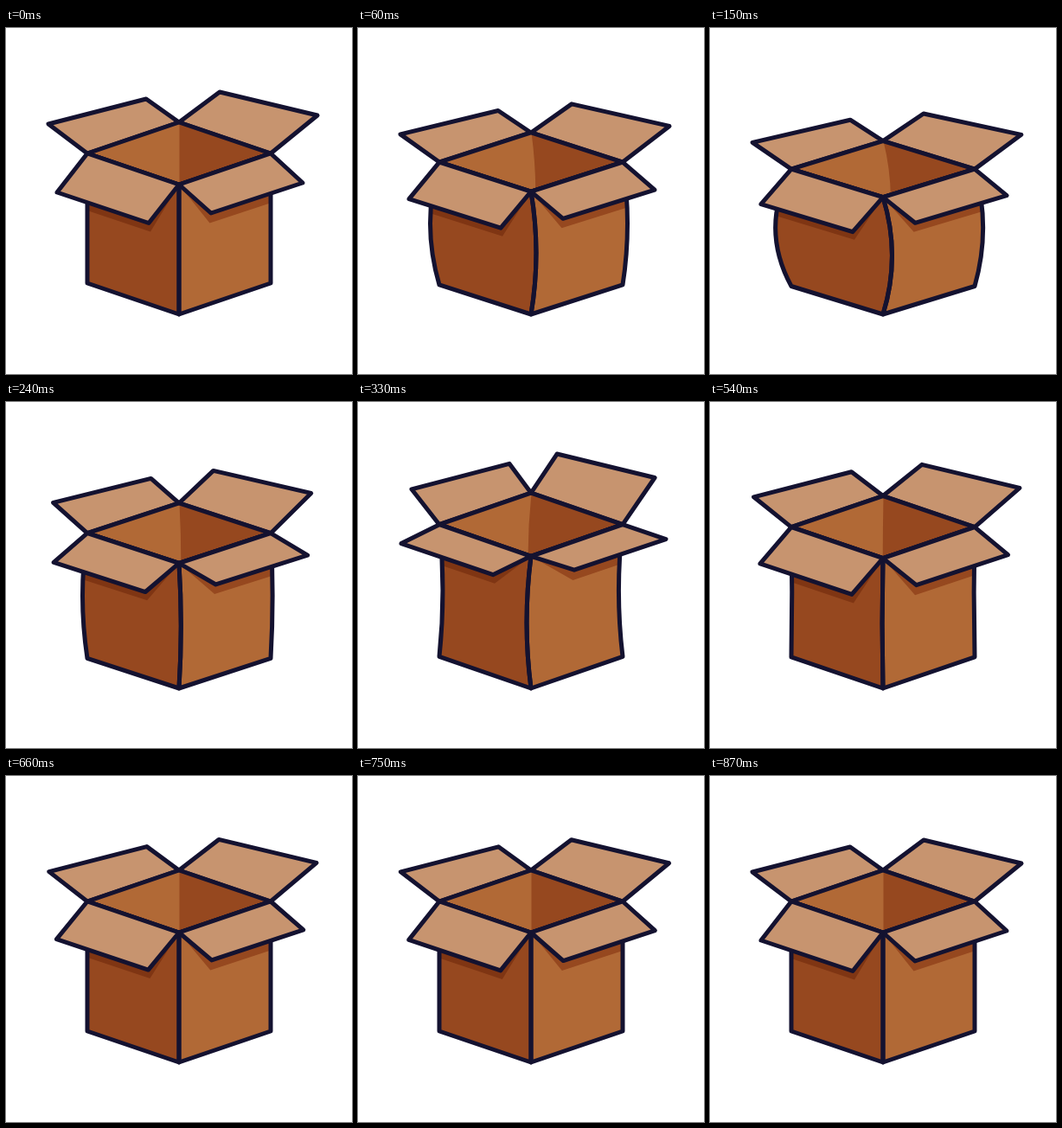
These frames come from a looping animation (400 px wide and 400 px high, 1900 ms). An HTML page:

```html
<!DOCTYPE html>
<html lang="en">
<head>
<meta charset="utf-8">
<title>Bouncing box</title>
<style>
  html, body { margin: 0; width: 100%; height: 100%; overflow: hidden; background: #fff; }
  svg { display: block; width: 100vw; height: 100vh; }
  .line { stroke: #141230; stroke-width: 5; stroke-linejoin: round; stroke-linecap: round; }
  .flap { fill: #c7946f; }
  .light { fill: #b16936; }
  .dark { fill: #96481f; }
  .deep { fill: #7f3513; }
  .none { fill: none; }
</style>
</head>
<body>
<svg viewBox="0 0 400 400">
  <defs>
    <clipPath id="clipLeft"><path data-part="leftFace"/></clipPath>
    <clipPath id="clipRight"><path data-part="rightFace"/></clipPath>
    <clipPath id="clipRim"><path data-part="rim"/></clipPath>
  </defs>
  <path class="flap line" data-part="backLeft"/>
  <path class="flap line" data-part="backRight"/>
  <path class="light" data-part="rim"/>
  <path class="dark" data-part="innerWall" clip-path="url(#clipRim)"/>
  <path class="none line" data-part="rim"/>
  <path class="dark" data-part="leftFace"/>
  <path class="light" data-part="rightFace"/>
  <path class="deep" data-part="leftShade" clip-path="url(#clipLeft)"/>
  <path class="dark" data-part="rightShade" clip-path="url(#clipRight)"/>
  <path class="none line" data-part="leftFace"/>
  <path class="none line" data-part="rightFace"/>
  <path class="flap line" data-part="frontLeft"/>
  <path class="flap line" data-part="frontRight"/>
</svg>
<script>
const LOOP = 1900, STEP = 30, SETTLED = 870, FLOOR = 331;

// Each track lists [time in ms, value].
const tracks = {
  scale: [[0, 1], [60, .946], [120, .895], [240, .964], [335, 1.018], [450, 1.011], [540, 1.002], [660, 1]],
  lift: [[0, 0], [140, 0], [240, .43], [335, 1], [450, .29], [540, .12], [660, .06], [870, 0]],
  bend: [[0, 0], [60, 6], [120, 11.5], [240, 2.3], [335, -5], [450, -3], [570, -.5], [660, 0]],
  leftBend: [[0, 0], [60, -10.5], [120, -20], [240, -5.5], [335, 4], [450, 2.5], [570, .4], [660, 0]]
};

const back = [200, 109], left = [94, 145], right = [306, 145], front = [200, 181];
const footLeft = [94, 295], foot = [200, 331], footRight = [306, 295];

// Outer corners at rest, and how far they travel when fully lifted.
const flaps = {
  backLeft: { hinge: [left, back], tips: [[162, 82], [49, 111]], move: [13, -6.2] },
  backRight: { hinge: [back, right], tips: [[360, 101], [247, 74]], move: [-17, -9.3] },
  frontLeft: { hinge: [left, front], tips: [[165, 225.5], [59, 190]], move: [-9, -23.6] },
  frontRight: { hinge: [front, right], tips: [[343, 179], [237, 214]], move: [13, -17.5] }
};

const chord = (keys, i) => (keys[i + 1][1] - keys[i][1]) / (keys[i + 1][0] - keys[i][0]);

function slope(keys, i) {
  if (i === 0) return chord(keys, 0);
  if (i === keys.length - 1) return 0;
  const a = chord(keys, i - 1), b = chord(keys, i);
  return a * b > 0 ? 2 * a * b / (a + b) : 0;
}

// Smooth curve through the keys that never overshoots them.
function sample(keys, t) {
  const i = keys.findIndex((k, n) => n < keys.length - 1 && t < keys[n + 1][0]);
  if (i < 0) return keys[keys.length - 1][1];
  const [t0, v0] = keys[i], [t1, v1] = keys[i + 1];
  const d = t1 - t0, u = (t - t0) / d, w = 1 - u;
  return v0 * (1 + 2 * u) * w * w + v1 * u * u * (3 - 2 * u)
    + d * u * w * (slope(keys, i) * w - slope(keys, i + 1) * u);
}

const shift = ([x, y], dx, dy) => [x + dx, y + dy];

function pose(t) {
  const { scale, lift, bend, leftBend } = Object.fromEntries(
    Object.entries(tracks).map(([name, keys]) => [name, sample(keys, t)]));
  const pt = ([x, y]) => `${x.toFixed(2)} ${(FLOOR + (y - FLOOR) * scale).toFixed(2)}`;
  const poly = points => 'M' + points.map(pt).join('L') + 'Z';
  const curve = (a, b, amount) =>
    `Q${pt([(a[0] + b[0]) / 2 + 2 * amount, (a[1] + b[1]) / 2])} ${pt(b)}`;

  const parts = { rim: poly([back, right, front, left]) };
  const tips = {};
  for (const [name, { hinge, tips: rest, move }] of Object.entries(flaps)) {
    tips[name] = rest.map(p => shift(p, move[0] * lift, move[1] * lift));
    parts[name] = poly([...hinge, ...tips[name]]);
  }

  const face = (top, bottom, amount) =>
    `M${pt(top)}${curve(top, bottom, amount)}L${pt(foot)}${curve(foot, front, bend)}Z`;
  parts.leftFace = face(left, footLeft, leftBend);
  parts.rightFace = face(right, footRight, bend * .92);

  const seamTop = [200.5, 109], seamFoot = [200.5, 259];
  parts.innerWall = `M${pt(seamTop)}${curve(seamTop, seamFoot, bend * .8)}L${pt([320, 259])}L${pt([320, 109])}Z`;

  const [leftNear, leftFar] = tips.frontLeft.map(p => shift(p, 2, 10));
  const [rightFar, rightNear] = tips.frontRight.map(p => shift(p, -1.5, 11.5));
  parts.leftShade = poly([front, leftNear, leftFar, left]);
  parts.rightShade = poly([front, rightNear, rightFar, right]);
  return parts;
}

const paths = [...document.querySelectorAll('[data-part]')];
const start = performance.now();

function draw() {
  const t = (performance.now() - start) % LOOP;
  const parts = pose(Math.min(Math.floor(t / STEP) * STEP, SETTLED));
  for (const path of paths) path.setAttribute('d', parts[path.dataset.part]);
  requestAnimationFrame(draw);
}
draw();
</script>
</body>
</html>
```
